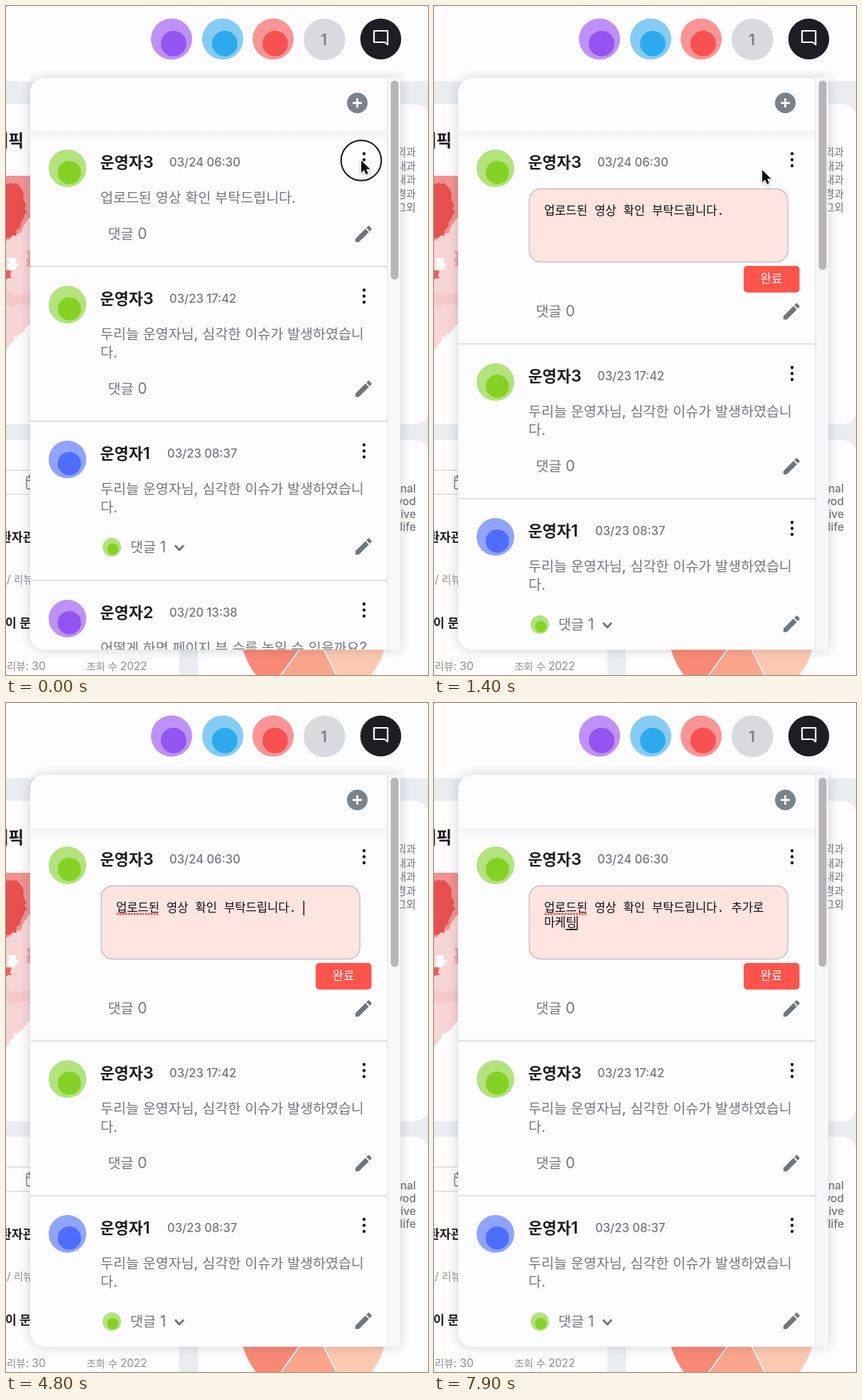
Animation, 594 px wide and 942 px high, one loop 8 s. Source, as an HTML page with a canvas:

```html
<!DOCTYPE html>
<html lang="ko">
<head>
<meta charset="utf-8">
<title>댓글 수정</title>
<style>
html, body { margin: 0; width: 100%; height: 100%; overflow: hidden; background: #fdfcfe; }
canvas { display: block; width: 594px; height: 942px; }
</style>
</head>
<body>
<canvas id="stage" width="594" height="942"></canvas>
<script>
const ctx = document.getElementById('stage').getContext('2d');
const LOOP = 8000, STEP = 100;
const WHITE = '#fdfcfe', INK = '#1c1c20', GRAY = '#75777e', PAGE = '#e9edf1';
const KR = '"Noto Sans CJK KR", "Noto Sans CJK"';
const MONO = `16.6px "Liberation Mono", ${KR}, monospace`;

const PURPLE = ['#bd91fa', '#9354f1'], BLUE = ['#85ccf5', '#2daaed'], RED = ['#fa9595', '#f75251'];
const GREEN = ['#b2e37c', '#85d224'], INDIGO = ['#8fa4fe', '#4f6dfd'];

const ISSUE = ['두리늘 운영자님, 심각한 이슈가 발생하였습니', '다.'];
const ITEMS = [
  { name: '운영자3', date: '03/24 06:30', dateX: 230, hue: GREEN, body: ['업로드된 영상 확인 부탁드립니다.'], foot: 93, end: 139, count: 0 },
  { name: '운영자3', date: '03/23 17:42', dateX: 230, hue: GREEN, body: ISSUE, foot: 119, end: 165, count: 0 },
  { name: '운영자1', date: '03/23 08:37', dateX: 227, hue: INDIGO, body: ISSUE, foot: 124, end: 171, count: 1 },
  { name: '운영자2', date: '03/20 13:38', dateX: 230, hue: PURPLE, body: ['어떻게 하면 페이지 뷰 수를 높일 수 있을까요?'], foot: 93, end: 139, count: 0 }
];

const MENU_AT = 200, EDIT_AT = 1400, FOCUS_AT = 2500, CARET_END_AT = 3200;
const DRAFT = '업로드된 영상 확인 부탁드립니다.';
// [time, added to first line, second line]
const KEYS = [
  [3600, ' '], [5000, ' ㅊ'], [5200, ' 추'], [5300, ' 축'], [5500, ' 추가'], [5600, ' 추갈'],
  [5800, ' 추가로'], [6200, ' 추가로 '],
  ...['ㅁ', '마', '맠', '마케', '마켙', '마케티', '마케팅'].map((s, i) => [6500 + i * 200, ' 추가로 ', s])
];

const PENCIL = new Path2D('M3 17.25V21h3.75L17.81 9.94l-3.75-3.75L3 17.25zM20.71 7.04c.39-.39.39-1.02 0-1.41l-2.34-2.34c-.39-.39-1.02-.39-1.41 0l-1.83 1.83 3.75 3.75 1.83-1.83z');
const ARROW = new Path2D('M0 0V17.2L4 13.4L6.8 19.8L9.8 18.5L7.1 12.3H12.4Z');
const HAND = new Path2D('M-1.8 1.5C-1.8-.6 1.6-.6 2 1.5L3.2 8.2C3.5 6.4 6 6.4 6.5 8.2C7 6.8 9.2 7 9.7 8.9C10.6 7.8 12.4 8.6 12.6 10.2L13.4 14.5C13.6 16.2 12.4 17.6 12.2 20L3.8 21.2C2.4 18.4-1.2 16-4.4 13.2C-6 11.6-3.8 9.6-2 10.8L.2 12.4Z');
const BUBBLE = new Path2D('M518 35H537.2V54.5L533.2 51H518Z');

function rect(x, y, w, h, color) { ctx.fillStyle = color; ctx.fillRect(x, y, w, h); }

function roundRect(x, y, w, h, r, fill, stroke) {
  ctx.beginPath();
  ctx.roundRect(x, y, w, h, r);
  if (fill) { ctx.fillStyle = fill; ctx.fill(); }
  if (stroke) { ctx.strokeStyle = stroke; ctx.lineWidth = 1.3; ctx.stroke(); }
}

function disc(x, y, r, color) {
  ctx.beginPath();
  ctx.arc(x, y, r, 0, 7);
  ctx.fillStyle = color;
  ctx.fill();
}

function line(points, color, width) {
  ctx.beginPath();
  points.forEach(([x, y]) => ctx.lineTo(x, y));
  ctx.strokeStyle = color;
  ctx.lineWidth = width;
  ctx.stroke();
}

function shadow(blur, alpha, y = 0) {
  ctx.shadowColor = `rgba(40,44,60,${alpha})`;
  ctx.shadowBlur = blur;
  ctx.shadowOffsetY = y;
}

// Hangul runs are set slightly smaller than Latin ones.
function text(str, x, y, size, color, weight = 400, right = false) {
  const runs = str.match(/[ㄱ-힣]+|[^ㄱ-힣]+/g).map(s => {
    const font = /[ㄱ-힣]/.test(s) ? `${weight} ${size * 0.93}px ${KR}, sans-serif` : `${weight} ${size}px Inter, sans-serif`;
    ctx.font = font;
    return { s, font, w: ctx.measureText(s).width };
  });
  if (right) x -= runs.reduce((sum, r) => sum + r.w, 0);
  ctx.fillStyle = color;
  for (const r of runs) {
    ctx.font = r.font;
    ctx.fillText(r.s, x, y);
    x += r.w;
  }
}

function avatar(x, y, r, [light, dark]) {
  disc(x, y, r, light);
  disc(x + r * 0.1, y + r * 0.22, r * 0.62, dark);
}

function rough(points, color, seed) {
  const rnd = () => (seed = (seed * 16807) % 2147483647) / 2147483647 - 0.5;
  ctx.beginPath();
  points.forEach(([x, y], i) => {
    const [nx, ny] = points[(i + 1) % points.length];
    const n = Math.max(1, Math.round(Math.hypot(nx - x, ny - y) / 4));
    for (let k = 0; k < n; k++) {
      ctx.lineTo(x + (nx - x) * k / n + rnd() * 4, y + (ny - y) * k / n + rnd() * 4);
    }
  });
  ctx.fillStyle = color;
  ctx.fill();
}

function drawMap() {
  ctx.save();
  ctx.beginPath();
  ctx.rect(0, 239, 36, 260);
  ctx.clip();
  rough([[-8, 230], [44, 230], [44, 444], [30, 450], [22, 462], [12, 466], [6, 478], [-8, 492]], '#f8d5d5', 11);
  rough([[-8, 230], [44, 230], [44, 296], [30, 300], [20, 318], [-8, 336]], '#f09391', 5);
  rough([[-8, 252], [14, 248], [24, 262], [28, 290], [20, 306], [14, 322], [-8, 330]], '#e7504f', 23);
  rough([[30, 346], [44, 340], [44, 372], [29, 366]], '#eda5a5', 8);
  rough([[3, 358], [12, 354], [18, 364], [10, 374], [4, 372]], WHITE, 31);
  rough([[-6, 374], [6, 373], [8, 383], [-6, 388]], '#e7605f', 42);
  rough([[-8, 398], [20, 408], [44, 400], [44, 420], [-8, 424]], '#f5c9c9', 17);
  ctx.restore();
}

function drawPie() {
  const cx = 433, cy = 878, r = 104;
  const cuts = [[-0.3, 1.107, '#fcc8b0'], [1.107, 2.195, '#fba58d'], [2.195, 3.5, '#f98977']];
  for (const [a, b, color] of cuts) {
    ctx.beginPath();
    ctx.moveTo(cx, cy);
    ctx.arc(cx, cy, r, a, b);
    ctx.closePath();
    ctx.fillStyle = color;
    ctx.fill();
    ctx.strokeStyle = WHITE;
    ctx.lineWidth = 1.5;
    ctx.stroke();
  }
}

function drawPage() {
  rect(0, 0, 594, 942, PAGE);
  rect(0, 0, 594, 106, WHITE);
  roundRect(-40, 138, 635, 451, 20, WHITE);
  roundRect(-40, 611, 284, 380, 20, WHITE);
  roundRect(270, 611, 325, 380, 20, WHITE);

  text('트래픽', 25, 198, 25.5, INK, 700, true);
  drawMap();
  ['외과', '내과', '내과', '신경과', '그외'].forEach((s, i) => text(s, 577, 211 + i * 19.6, 16, GRAY, 400, true));
  ['Signal', 'vod', 'live', 'life'].forEach((s, i) => text(s, 577, 684.5 + i * 18.3, 15.5, GRAY, 500, true));

  line([[0, 653.5], [40, 653.5]], '#cfd1d6', 1);
  line([[0, 687.5], [40, 687.5]], '#cfd1d6', 1);
  roundRect(29, 663, 18, 17, 2, null, GRAY);
  line([[29, 668], [40, 668]], GRAY, 1.5);
  line([[33, 660], [33, 665]], GRAY, 1.5);
  text('환자관', -8, 754, 18.5, INK, 700);
  text('/ 리뷰', 1, 813, 15.5, '#8d8f96');
  text('이 문', -1, 875, 18.5, INK, 700);
  text('리뷰: 30', 1, 934.5, 15.5, '#8d8f96');
  text('조회 수 2022', 113.5, 934.5, 15.2, '#8d8f96');
  drawPie();

  avatar(233, 46.5, 29, PURPLE);
  avatar(305, 46.5, 29, BLUE);
  avatar(376, 46.5, 29, RED);
  disc(448.3, 47, 29.3, '#d9dadf');
  text('1', 443, 55, 21, '#7b7d84', 600);
  disc(527.5, 46.5, 28.8, '#1d1d23');
  ctx.lineJoin = 'round';
  ctx.strokeStyle = '#fff';
  ctx.lineWidth = 2.2;
  ctx.stroke(BUBBLE);
}

function drawItem(item, c, editing) {
  avatar(86.5, c + 0.5, 26.5, item.hue);
  text(item.name, 132.5, c - 0.5, 23.5, INK, 600);
  text(item.date, item.dateX, c - 2, 16.6, GRAY, 500);
  for (const dy of [-20, -11.5, -3]) disc(504, c + dy, 2.2, INK);
  if (!editing) item.body.forEach((s, i) => text(s, 133, c + 48.5 + i * 26.5, 21, GRAY));

  const extra = editing ? 109 : 0, fy = c + item.foot + extra;
  if (item.count) {
    avatar(149, fy, 13, GREEN);
    line([[238, fy - 2.5], [244, fy + 4], [250, fy - 2.5]], '#6e747b', 2.8);
  }
  text('댓글 ' + item.count, item.count ? 175 : 143.5, fy + 7, 21, GRAY);
  ctx.save();
  ctx.translate(503.3, fy - (item.count ? 1 : 0));
  ctx.scale(1.27, 1.27);
  ctx.translate(-12, -12);
  ctx.fillStyle = '#6f757c';
  ctx.fill(PENCIL);
  ctx.restore();
  const end = c + item.end + extra;
  rect(34, end - 1, 503, 1.6, '#d9dbe0');
  return end + 53;
}

function drawEditor(t) {
  roundRect(134, 257.5, 364, 103, 16, '#ffe4e0', '#bfbfc3');
  roundRect(436, 366, 78.5, 37.5, 5, '#fe544b');
  text('완료', 459.5, 390, 18, '#fff', 500);

  const key = KEYS.filter(k => k[0] <= t).pop() || [0, ''];
  const second = key[2] || '';
  const lines = [DRAFT + key[1], second];
  ctx.font = MONO;
  ctx.fillStyle = '#0c0c0e';
  lines.forEach((s, i) => ctx.fillText(s, 155, 294 + i * 21));
  if (t < FOCUS_AT) return;

  for (let x = 157; x < 214; x += 4) disc(x, 297, 1.5, '#f0443f');
  const row = second ? 1 : 0, s = lines[row], atEnd = t >= CARET_END_AT;
  const x = 155 + (atEnd ? ctx.measureText(s).width : 0);
  const last = s.slice(-1);
  if (key[0] && last !== ' ') {
    const w = ctx.measureText(last).width;
    rect(x - w, 297 + row * 21, w, 1.8, '#0c0c0e');
  }
  const since = t - Math.max(FOCUS_AT, atEnd ? CARET_END_AT : 0, key[0]);
  if (since % 1000 < 500) rect(x, 279 + row * 21, 1.4, 20, '#0c0c0e');
}

function drawMenu(hover) {
  ctx.save();
  shadow(7, 0.25);
  roundRect(410, 201.5, 78.5, 105.5, 4, WHITE);
  ctx.restore();
  if (hover) roundRect(410, 201.5, 78.5, 53, [4, 4, 0, 0], '#fce3d8');
  text('수정', 433.5, 234.5, 18, INK);
  text('삭제', 433.5, 286.5, 18, INK);
}

function drawPanel(t, mouse) {
  const editing = t >= EDIT_AT;
  const corners = [20, 3, 3, 20];
  ctx.save();
  shadow(16, 0.2);
  roundRect(34, 101, 521, 805.5, corners, WHITE);
  ctx.restore();

  ctx.save();
  ctx.beginPath();
  ctx.roundRect(34, 101, 521, 805.5, corners);
  ctx.clip();
  ITEMS.reduce((c, item, i) => drawItem(item, c, editing && i === 0), 228);
  if (editing) drawEditor(t);

  const g = ctx.createLinearGradient(0, 176, 0, 193);
  g.addColorStop(0, 'rgba(60,60,80,.055)');
  g.addColorStop(1, 'rgba(60,60,80,0)');
  rect(34, 176, 503, 17, g);
  disc(494.5, 136.5, 14.5, '#7a838b');
  line([[488, 136.5], [501, 136.5]], '#fff', 3);
  line([[494.5, 130], [494.5, 143]], '#fff', 3);

  rect(537, 101, 18, 806, '#f8f7fa');
  rect(536.5, 101, 1.2, 806, '#e1e1e6');
  roundRect(541.5, 105, 11, editing ? 266.5 : 280, 5.5, '#b6b5b8');
  if (t >= MENU_AT && !editing) drawMenu(mouse.hover);
  ctx.restore();
}

function mouseAt(t) {
  const ease = (from, to) => {
    const p = Math.min(1, Math.max(0, (t - from) / (to - from)));
    return p * p * (3 - 2 * p);
  };
  const a = ease(400, 1000), b = ease(1500, 2200);
  const x = 500 - 38 * a - 13 * b, y = 217.5 + 13.5 * a + 48 * b;
  const hover = t >= MENU_AT && t < EDIT_AT && x < 488 && y < 254;
  return { x, y, hover, beam: t >= EDIT_AT && y > 258 };
}

function drawMouse(t, { x, y, hover, beam }) {
  const down = [0, 1200].find(d => t >= d && t < d + 200);
  if (down !== undefined) {
    ctx.beginPath();
    ctx.arc(x, y, t - down < 100 ? 28.3 : 40, 0, 7);
    ctx.strokeStyle = '#111';
    ctx.lineWidth = 1.9;
    ctx.stroke();
  }
  if (t >= CARET_END_AT) return;
  ctx.save();
  ctx.translate(x, y);
  ctx.lineJoin = 'round';
  if (beam) {
    for (const [color, width] of [['rgba(255,255,255,.8)', 3], ['#111', 1.4]]) {
      line([[0, -8], [0, 9]], color, width);
      line([[-4, -10.5], [-1.5, -10], [0, -8], [1.5, -10], [4, -10.5]], color, width);
      line([[-4, 11.5], [-1.5, 11], [0, 9], [1.5, 11], [4, 11.5]], color, width);
      line([[-2.5, 4], [2.5, 4]], color, width);
    }
  } else {
    const shape = hover ? HAND : ARROW;
    shadow(3, 0.35, 1);
    ctx.strokeStyle = hover ? '#111' : '#fff';
    ctx.lineWidth = hover ? 1.6 : 2.4;
    ctx.stroke(shape);
    ctx.shadowColor = 'transparent';
    ctx.fillStyle = hover ? '#fff' : '#0a0a0a';
    ctx.fill(shape);
    if (hover) for (const fx of [4.8, 7.4, 10]) line([[fx, 13], [fx + 0.4, 17.5]], '#111', 1);
  }
  ctx.restore();
}

function draw(t) {
  const mouse = mouseAt(t);
  drawPage();
  drawPanel(t, mouse);
  drawMouse(t, mouse);
}

function frame(now) {
  draw(Math.floor((now % LOOP) / STEP) * STEP);
  requestAnimationFrame(frame);
}

draw(0);
requestAnimationFrame(frame);
</script>
</body>
</html>
```
